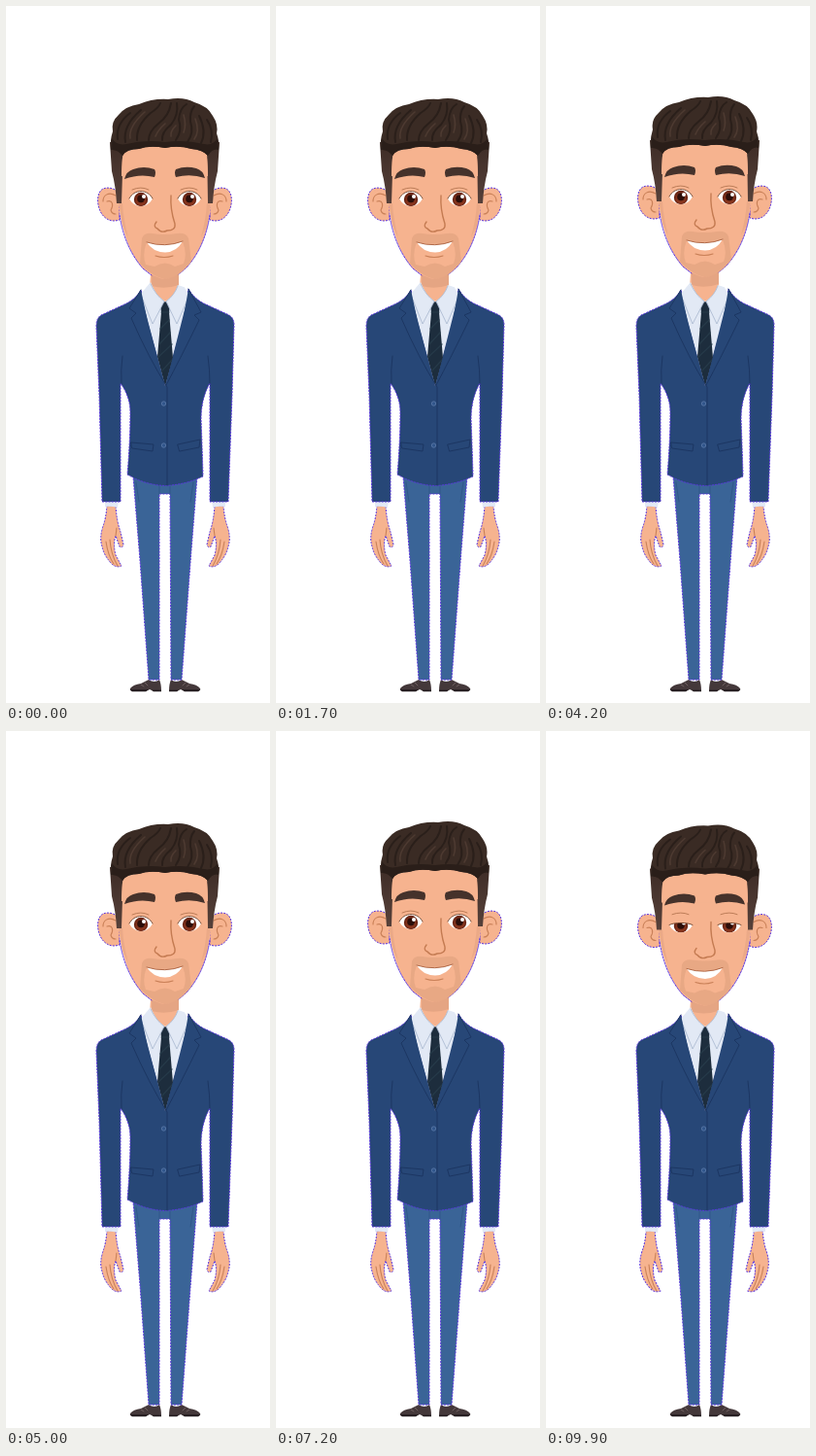
These frames come from a looping animation (272 by 717 pixels, 10000 ms). An HTML page:

```html
<!DOCTYPE html>
<html lang="en">
<head>
<meta charset="utf-8">
<title>Standing man, blinking</title>
<style>
html, body { margin: 0; width: 100%; height: 100%; overflow: hidden; background: #fff; }
svg { display: block; width: 272px; height: 717px; }
.skin { fill: #f6b38f; }
.shade { fill: #e5a583; }
.jacket { fill: #274777; }
.shirt { fill: #e2e9f5; }
.brow { fill: #45322b; }
.rim { stroke: #5a35e0; stroke-width: 1; stroke-dasharray: 2 1.2; }
.line { fill: none; stroke-linecap: round; stroke-linejoin: round; }
.seam { stroke: #1b3560; stroke-width: .9; }
.fold { stroke: #c98058; stroke-width: 1.1; }
</style>
</head>
<body>
<svg viewBox="0 0 272 717">
  <defs>
    <clipPath id="opening"><path id="eyeShape"/></clipPath>
    <g id="eye">
      <g clip-path="url(#opening)">
        <rect x="-14" y="-12" width="28" height="24" fill="#fff"/>
        <circle r="7.2" fill="#6d2817"/>
        <circle cy="1" r="5.4" fill="#85341d"/>
        <circle cy="-.6" r="3.8" fill="#2b0e0a"/>
        <circle cx="3" cy="-3" r="2" fill="#fff"/>
      </g>
      <path id="lash" class="line" stroke="#6b4029" stroke-width=".9"/>
      <path id="crease" class="line" stroke="#bd7d58" stroke-width="1"/>
    </g>
    <g id="hand">
      <path class="skin rim" d="M104 514H113Q114 530 118 541L121 554Q120 558 117 556L113 545Q110 553 113 565L119 576Q115 578 110 575Q101 566 99 556Q96 547 100 535Q103 527 104 514Z"/>
      <path class="line fold" d="M103 551Q105 565 111 574M107 549Q108 564 115 576M113 545L114 537"/>
    </g>
    <g id="shoe">
      <path d="M148 691H158V698H148Z" fill="#e9edf5"/>
      <path d="M128 702Q131 698 139 697L147 693Q153 697 158 693Q160 697 160 705H152L148 703L144 705H130Q127 704 128 702Z" fill="#44383a"/>
      <path d="M128 703H147L144 705.2H130ZM150 703.500H160V705.200H152Z" fill="#271f22"/>
      <path class="line" d="M139 698L142 700M143 696L146 699" stroke="#7b6b6b" stroke-width=".8"/>
    </g>
    <g id="ear">
      <path class="skin rim" d="M117 193C112 187 105 186 100 188C94 191 93 202 97 211C101 219 108 223 117 220Z"/>
      <path class="line fold" d="M113 195C106 191 100 194 100 201M104 201C110 199 111 205 108 210Q109 214 113 214"/>
    </g>
    <linearGradient id="temple" x2="0" y2="1">
      <stop stop-color="#3d2c26"/><stop offset="1" stop-color="#57413a"/>
    </linearGradient>
  </defs>

  <use href="#shoe"/>
  <use href="#shoe" transform="matrix(-1 0 0 1 328 0)"/>
  <path class="rim" fill="#3a6497" d="M131 484H197L190.500 566L181 693H170L169 502H158V693H147L138 570Z"/>
  <path class="line" d="M158 502V489M169 502V489M134 490L137 510M193 490L190 510" stroke="#31578a"/>

  <g id="leftHand"><use href="#hand"/></g>
  <g id="rightHand"><use href="#hand" transform="matrix(-1 0 0 1 328 0)"/></g>
  <path class="shirt" d="M102 508H116L115 516Q108 514 102 515ZM212 508H226V515Q219 514 213 516Z"/>

  <g id="neck">
    <path class="skin" d="M150 262H178V292L164 306L148 290Z"/>
    <path class="shade" d="M150 272H178V287Q164 292 150 288Z"/>
  </g>

  <path class="jacket rim" d="M139 292Q134 301 124 306L98 318Q93 321 93 329L96 400L99 510H118V388Q128 402 128 418Q128 446 125 482Q144 493 165 493.500Q186 492 203 484Q202 448 201 425Q201 404 210 388V510H229L233 400L235 328Q235 321 230 318L204 306Q194 301 188 291L164 390Z"/>
  <path class="shirt" d="M145 289L164 304L184 289L187 301L164 391L140 301Z"/>
  <path fill="#1d2d3d" d="M159 307L164 304L169 307L168 315L172 362L164 391L156 361L160 315Z"/>
  <path class="line" d="M160 315H168M158 348L169 336M157 361L171 348M161 375L171 364M159 332L168 323" stroke="#263a49" stroke-width="1.2"/>
  <path class="shirt" d="M149 284L139 296L151 327L163 304Q154 297 149 284ZM177 287Q174 297 165 304L176 327L189 297L183 289Z"/>
  <path class="line" d="M149 286Q154 297 163 304L151 327L141 302M177 288Q174 297 165 304L176 327L187 302" stroke="#a9b8d0" stroke-width=".8"/>
  <path class="jacket" d="M139 292L127 311L134 316L129 321L160 384L164 391L156 361L146 325ZM188 291L201 315L194 318L199 323L167 384L164 391L172 361L182 325Z"/>
  <path class="line seam" d="M139 292L127 311L134 316L129 321Q147 362 166 392V493M188 291L201 315L194 318L199 323Q180 362 165 390M119 389Q118 374 120 360M210 389Q210 374 208 360M129 449L152 451L151 458L130 455ZM177 451L200 446L199 454L179 458Z"/>
  <g fill="#31568b" stroke="#5876a5" stroke-width=".9">
    <circle cx="162.500" cy="409" r="2.200"/><circle cx="162.500" cy="452" r="2.200"/>
  </g>

  <g id="head">
    <use href="#ear"/>
    <use href="#ear" transform="matrix(-1 0 0 1 327 0)"/>
    <path class="skin" d="M114 150H213Q214 200 207 229Q201 252 186 269Q173 281 163 281Q152 279 141 270Q127 254 121 230Q113 202 114 150Z"/>
    <path class="line rim" d="M117 215Q122 248 141 270L150 277M210 215Q205 248 186 269L178 276"/>
    <path class="shade" opacity=".65" d="M116 200L120 203Q121 220 126 238L120 226ZM211 200L207 203Q206 219 201 238L207 226Z"/>
    <path class="shade" opacity=".8" d="M140 239Q142 233 151 234Q163 236 176 234Q186 233 188 239L191 263Q177 281 163 281Q152 279 138 265ZM145 243Q140 256 144 266L153 268Q164 261 174 268L183 265Q187 254 182 243Q164 247 145 243Z" fill-rule="evenodd"/>
    <path fill="url(#temple)" d="M107 140L121 142L119 203H114Q113 185 109 170ZM220 140L207 142L208 203H213Q214 185 218 170Z"/>
    <path class="skin" d="M119 175Q119 153 122 150Q142 143 164 144Q186 143 205 150Q208 153 208 175Z"/>
    <path fill="#3a2b24" d="M108 148Q107 138 110 129Q108 119 116 112Q123 103 137 101Q151 95 167 96Q183 93 194 99Q208 103 213 113Q219 122 217 131Q220 139 219 148Q213 146 208 154Q203 148 191 147Q178 143 164 146Q148 143 137 147Q124 147 120 154Q115 147 108 148Z"/>
    <path fill="#2a1e19" d="M109 136Q114 144 124 142Q143 137 164 140Q184 137 204 142Q213 144 218 136L219 148Q213 146 208 154Q203 148 191 147Q178 143 164 146Q148 143 137 147Q124 147 120 154Q115 147 108 148Z"/>
    <path class="line" d="M115 137Q113 121 128 110M123 140Q120 123 139 107M135 138Q134 123 149 110Q157 105 159 100M147 138Q147 129 157 121Q168 113 170 100M161 138Q160 130 170 122Q178 112 176 100M175 138Q182 128 178 117Q179 105 186 101M187 140Q194 130 190 119Q189 109 194 103M201 141Q207 129 199 113M211 140Q214 127 207 117" stroke="#2a1f1a" stroke-width="2"/>
    <path class="line" d="M128 136Q126 124 143 109M154 134Q157 127 164 121M194 137Q200 129 195 116M183 112Q186 122 183 130M170 134Q169 129 175 123" stroke="#4d3a31" stroke-width="1.600"/>

    <path class="brow" d="M122 178Q124 170 131 168Q142 164 153 168Q155 171 153 176Q138 172 122 178ZM205 177Q203 169 196 167Q185 164 175 168Q173 171 175 176Q190 172 205 177Z"/>
    <use href="#eye" x="139" y="199"/>
    <use href="#eye" x="189" y="199"/>
    <path class="line" d="M170 195Q169 209 174 224Q175 231 166 231Q160 234 156 229Q151 227 155 222" stroke="#c47b52" stroke-width="1.400"/>
    <path fill="#fff" d="M145 243Q164 249 182 242Q176 253 164 253.500Q151 253 145 243Z"/>
    <path class="line" d="M145 243Q164 249 182 242" stroke="#b06a49"/>
    <path class="line fold" d="M154 257Q163 260 172 257"/>
  </g>
</svg>
<script>
const LOOP = 10000;
const $ = id => document.getElementById(id);

// Blink steps, 100 ms each: [lid closure, head offset, arm angle]
const REST = [0, 0, 0];
const DIP = [.36, 1.5, .25], SHUT = [1, .8, .15], RISE = [.27, -.7, 0], HIGH = [0, -2, 0], SETTLE = [0, -1, 0];
const blinks = [
  [900, DIP, SHUT, RISE, HIGH],
  [3900, DIP, SHUT, RISE, HIGH, SETTLE],
  [6900, DIP, SHUT, RISE, HIGH, SETTLE],
  [9900, DIP]
];

function poseAt(time) {
  for (const [start, ...steps] of blinks) {
    const step = Math.floor((time - start) / 100);
    if (steps[step]) return steps[step];
  }
  return REST;
}

function draw(now) {
  const [lid, lift, swing] = poseAt(now % LOOP);
  const edge = -11 + lid * 20;
  const upper = `M-12 -1C-7 ${edge} 7 ${edge} 12 -1`;
  $('eyeShape').setAttribute('d', `${upper}C7 9.5 -7 9.5 -12 -1Z`);
  $('lash').setAttribute('d', upper);
  $('crease').setAttribute('d', `M-9 ${-10 - lid * 5}Q0 ${-14 - lid * 3} 8 ${-10 - lid * 5}`);
  $('head').setAttribute('transform', `translate(0 ${lift})`);
  $('neck').setAttribute('transform', `translate(0 ${lift / 2})`);
  $('leftHand').setAttribute('transform', `rotate(${swing} 110 325)`);
  $('rightHand').setAttribute('transform', `rotate(${swing} 218 325)`);
  requestAnimationFrame(draw);
}
draw(performance.now());
</script>
</body>
</html>
```
